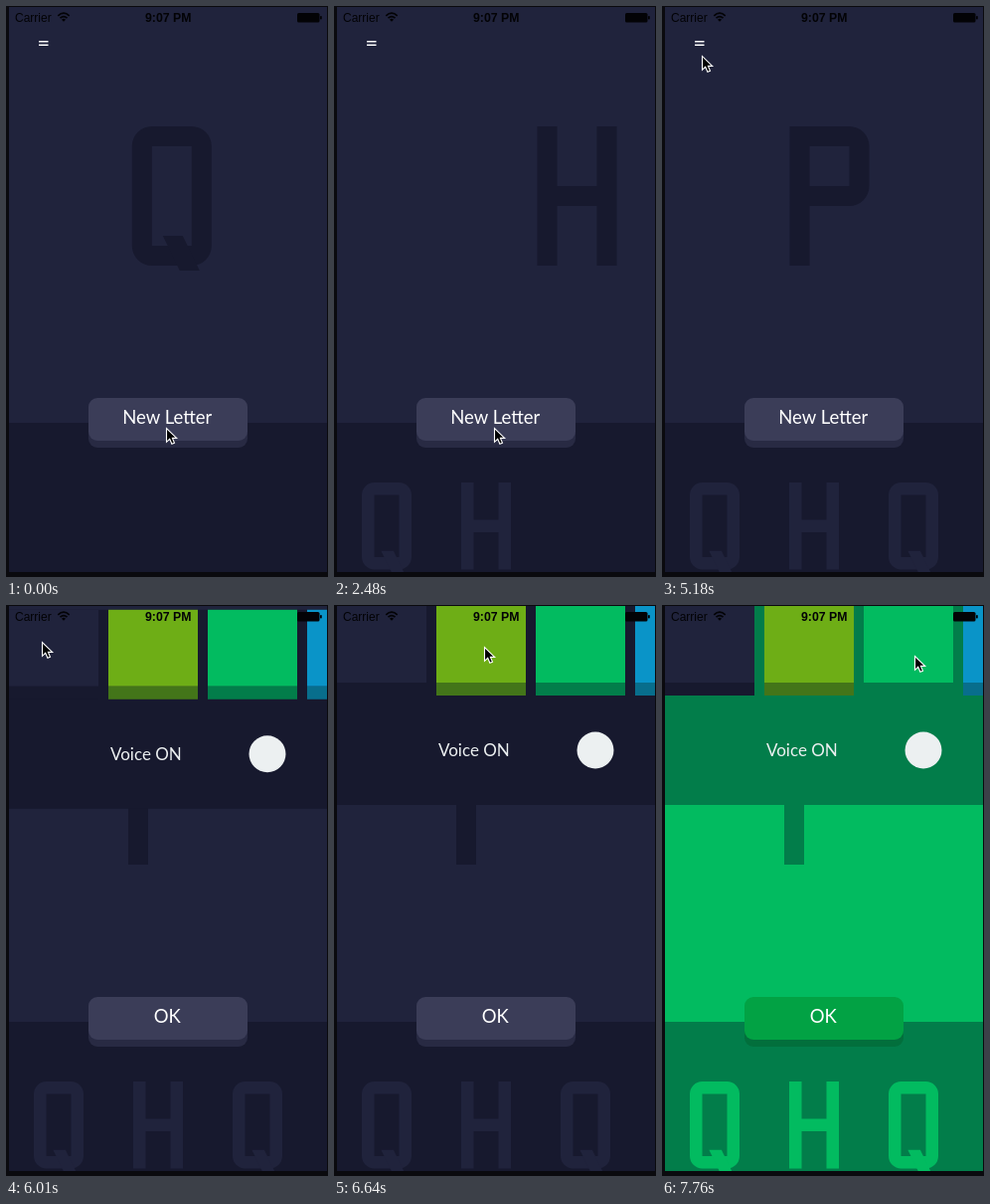
Write an HTML page that moves like this. It is 324 by 574 pixels and loops after 8000 ms.

```html
<!DOCTYPE html>
<html lang="en">
<head>
<meta charset="utf-8">
<title>Letters</title>
<style>
  html, body { margin: 0; width: 100%; height: 100%; overflow: hidden; background: #0a0a0e; }
  svg { display: block; width: 324px; height: 574px; }
  .label { font-family: Lato, sans-serif; }
  .status { font-family: "Liberation Sans", Arial, sans-serif; }
  .main { fill: var(--main); }
  .dark { fill: var(--dark); }
  .face { fill: var(--face); }
  .edge { fill: var(--edge); }
</style>
</head>
<body>
<svg id="stage" viewBox="0 0 324 574" xmlns="http://www.w3.org/2000/svg">
  <defs>
    <clipPath id="screen"><rect x="3" y="1" width="320" height="568"/></clipPath>
    <g id="Q">
      <path fill-rule="evenodd" d="M20 0H60A20 20 0 0 1 80 20V120A20 20 0 0 1 60 140H20A20 20 0 0 1 0 120V20A20 20 0 0 1 20 0ZM20 20V120H60V20Z"/>
      <path d="M31 110H51L68 145H48Z"/>
    </g>
    <path id="H" d="M0 0H20V60H60V0H80V140H60V80H20V140H0Z"/>
    <path id="P" fill-rule="evenodd" d="M0 0H60A20 20 0 0 1 80 20V60A20 20 0 0 1 60 80H20V140H0ZM20 20V60H60V20Z"/>
  </defs>
  <rect width="324" height="574" fill="#0a0a0e"/>
  <g clip-path="url(#screen)">
    <rect class="main" x="3" y="1" width="320" height="418"/>
    <rect class="dark" x="3" y="419" width="320" height="150"/>
    <g fill="#fff">
      <rect x="33" y="35" width="9.5" height="1.5"/>
      <rect x="33" y="38.5" width="9.5" height="1.5"/>
    </g>
    <use id="big" class="dark" href="#Q"/>
    <g id="row" class="main"></g>
    <rect class="edge" x="83" y="402" width="160" height="42" rx="9"/>
    <g id="button">
      <rect class="face" x="83" y="394" width="160" height="43" rx="9"/>
      <text id="caption" class="label" x="162.3" y="420" font-size="18.5" text-anchor="middle" fill="#fff"></text>
    </g>
    <g id="panel">
      <rect class="dark" x="3" y="1" width="320" height="200"/>
      <g id="swatches"></g>
      <text class="label" x="105" y="152" font-size="17" fill="#ecf0f1">Voice ON</text>
      <circle cx="263" cy="146" r="18.5" fill="#ecf0f1"/>
    </g>
    <g class="status" fill="#030306">
      <text x="9" y="15.5" font-size="12">Carrier</text>
      <text x="163.2" y="15.5" font-size="12.3" font-weight="bold" text-anchor="middle">9:07 PM</text>
      <g fill="none" stroke="#030306" stroke-width="1.7">
        <path d="M52.3 9.8Q58 4.6 63.7 9.8M54.5 12.2Q58 9 61.5 12.2"/>
      </g>
      <path d="M56 13.7Q58 12 60 13.7L58 15.8Z"/>
      <rect x="293" y="7" width="22.5" height="9.5" rx="1.6"/>
      <rect x="316" y="10" width="1.8" height="3.6" rx=".8"/>
    </g>
    <path id="cursor" d="M0 .5V14.3L3.2 11.3L5.4 16.3L8 15.2L5.9 10.4H10.2Z" fill="#000" stroke="#fff" stroke-width="1.1"/>
  </g>
</svg>
<script>
const LOOP = 8000;
const MENU = 5830;
const WORD = ["Q", "H", "Q", "P"];
const PRESSES = [[600, 780], [2360, 2480], [4250, 4420]];
const FIRST_ENTRY = -180;   // the opening letter is still settling
const ENTRY_DELAY = 710;
const EXIT = 300;

const THEMES = [
  { at: 0,    main: "#20233c", dark: "#17192e", face: "#3b3d58", edge: "#282a43" },
  { at: 6940, main: "#6eae16", dark: "#437519", face: "#549400", edge: "#346207" },
  { at: 7760, main: "#02bb60", dark: "#027d4a", face: "#02a244", edge: "#026f3c" }
];
const BLUE = { main: "#0a94c8", dark: "#086e8c" };

// time, x, y of the pointer tip
const PATH = [
  [0, 161.5, 424], [4540, 161.5, 424], [4710, 84.5, 126], [4950, 84.5, 126],
  [5180, 40.5, 50], [5530, 36.5, 37], [6040, 36.5, 37], [6580, 147.5, 42.5],
  [6640, 151.5, 42], [7230, 151.5, 42], [7520, 254.5, 51], [LOOP, 254.5, 51]
];

const $ = id => document.getElementById(id);
const move = (el, x, y) => el.setAttribute("transform", `translate(${x} ${y})`);

function add(parent, tag, attrs) {
  const el = document.createElementNS("http://www.w3.org/2000/svg", tag);
  for (const key in attrs) el.setAttribute(key, attrs[key]);
  return parent.appendChild(el);
}

[...THEMES, BLUE].forEach((c, i) => {
  const x = 3 + 100 * i;
  add($("swatches"), "rect", { x, y: 1, width: 90, height: 77, fill: c.main });
  add($("swatches"), "rect", { x, y: 78, width: 90, height: 13, fill: c.dark });
});

const row = PRESSES.map((_, i) => add($("row"), "use", {
  href: "#" + WORD[i], transform: `translate(${28 + 100 * i} 479) scale(.625)`
}));

// Runs from 0 to 1 with a small overshoot
function spring(ms) {
  const s = Math.max(0, ms) / 1000;
  return 1 - Math.exp(-14 * s) * Math.cos(10 * s);
}

function pointer(t) {
  const i = PATH.findIndex(p => p[0] > t);
  const [t0, x0, y0] = PATH[i - 1], [t1, x1, y1] = PATH[i];
  const k = (t - t0) / (t1 - t0);
  return [x0 + (x1 - x0) * k, y0 + (y1 - y0) * k];
}

function letter(t) {
  const count = PRESSES.filter(p => t >= p[0]).length;
  const last = count ? PRESSES[count - 1][0] : -Infinity;
  if (t - last < EXIT) {
    return { count, name: WORD[count - 1], shift: 202 * (t - last) / EXIT };
  }
  const entry = count ? last + ENTRY_DELAY : FIRST_ENTRY;
  return { count, name: WORD[count], shift: 203 * (spring(t - entry) - 1) };
}

function draw(t) {
  const theme = THEMES.filter(c => t >= c.at).pop();
  for (const key of ["main", "dark", "face", "edge"]) {
    $("stage").style.setProperty("--" + key, theme[key]);
  }

  const { count, name, shift } = letter(t);
  $("big").setAttribute("href", "#" + name);
  move($("big"), 123 + shift, 121);
  row.forEach((el, i) => el.style.display = i < count ? "" : "none");

  const pressed = PRESSES.some(([down, up]) => t >= down && t < up);
  move($("button"), 0, pressed ? 5 : 0);
  $("caption").textContent = t < MENU ? "New Letter" : "OK";

  move($("panel"), 0, 201 * (spring(t - MENU) - 1));
  move($("cursor"), ...pointer(t));
}

const start = performance.now();
function tick() {
  draw((performance.now() - start) % LOOP);
  requestAnimationFrame(tick);
}
tick();
</script>
</body>
</html>
```
